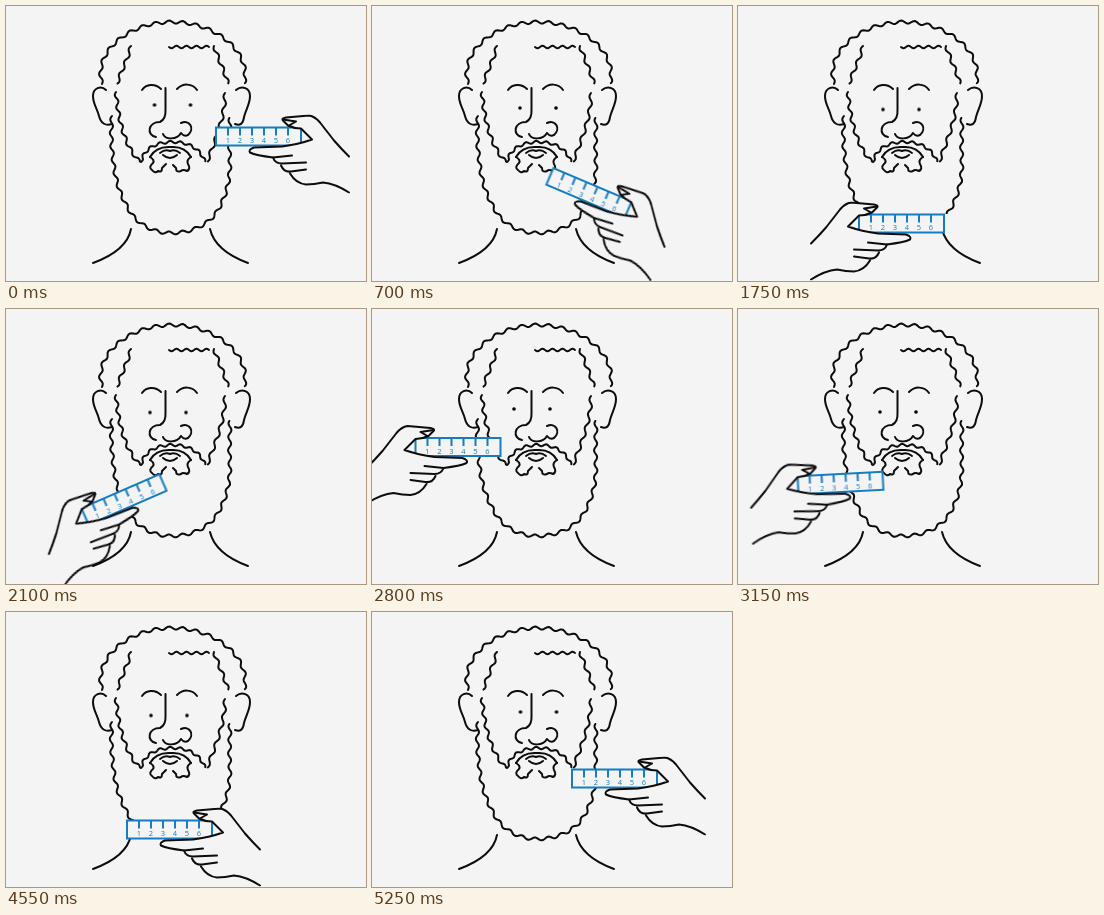
These frames come from a looping animation (360 by 275 pixels, 5.6 s). An HTML page:

```html
<!DOCTYPE html>
<html lang="en">
<head>
<meta charset="utf-8">
<title>Beard measuring</title>
<style>
html, body { margin: 0; width: 100%; height: 100%; overflow: hidden; background: #f4f4f4; }
svg { display: block; width: 360px; height: 275px; }
.ink { fill: none; stroke: #0c0c0c; stroke-width: 2; stroke-linecap: round; stroke-linejoin: round; }
.skin { fill: #f4f4f4; }
.ruler { fill: #f4f4f4; stroke: #137dc5; stroke-width: 2; }
.digits { font: 7.5px "Open Sans", sans-serif; fill: #137dc5; text-anchor: middle; }
#tool, #eyes, #cover, #right, #left { animation: 5.6s step-end infinite; }
#tool { animation-name: tool; }
#eyes { animation-name: eyes; }
#cover { animation-name: cover; }
#right { animation-name: right; }
#left { animation-name: left; }

@keyframes tool {
  0%, 100% { transform: translate(252.5px, 130.5px) rotate(0deg); }
  6.25%, 93.75% { transform: translate(242.5px, 166.5px) rotate(0deg); }
  12.5%, 87.5% { transform: translate(217px, 187px) rotate(23deg); }
  18.75%, 25%, 31.25%, 68.75%, 75%, 81.25% { transform: translate(163.5px, 217.5px) rotate(0deg); }
  37.5%, 62.5% { transform: translate(118px, 190.5px) rotate(-23.5deg); }
  43.75%, 56.25% { transform: translate(102.5px, 174px) rotate(-3deg); }
  50% { transform: translate(86px, 138px) rotate(0deg); }
}
@keyframes eyes {
  0%, 100% { transform: translate(148.5px, 99px); }
  6.25%, 93.75% { transform: translate(148.5px, 100px); }
  12.5%, 87.5% { transform: translate(148px, 102px); }
  18.75%, 25%, 31.25%, 68.75%, 75%, 81.25% { transform: translate(145px, 103.5px); }
  37.5%, 62.5% { transform: translate(144px, 103.5px); }
  43.75%, 56.25% { transform: translate(142px, 103px); }
  50% { transform: translate(142px, 100px); }
}
@keyframes cover {
  0%, 37.5%, 87.5%, 100% { visibility: hidden; }
  18.75%, 68.75% { visibility: visible; }
}
@keyframes right {
  0%, 75%, 100% { visibility: visible; }
  31.25% { visibility: hidden; }
}
@keyframes left {
  0%, 81.25%, 100% { visibility: hidden; }
  25% { visibility: visible; }
}
</style>
</head>
<body>
<svg viewBox="0 0 360 275">
  <defs>
    <g id="hand">
      <path class="skin" d="M133 29L118 13L104 -5Q99 -11 93 -12L70 -10Q65 -9 67 -7L72 -2Q78 1 85 1L96 12Q82 17 66 19L38 20Q32 22 34 25Q40 28 57 30Q59 36 65 36Q68 44 74 45Q80 56 90 57L107 55Q119 56 133 65Z"/>
      <path class="ink" d="M133 29Q125 21 118 13L104 -5Q99 -11 93 -12L70 -10Q65 -9 67 -7L72 -2Q78 1 85 1L96 12Q82 17 66 19L38 20Q32 22 34 25Q40 28 57 30L76 28"/>
      <path class="ink" d="M57 30Q59 36 66 36L90 35M65 38Q68 45 75 44L90 42M74 46Q80 56 90 57Q98 57 107 55Q119 56 133 65M67 -8L80 -6L73 -2"/>
    </g>
  </defs>

  <g class="ink">
    <path class="wavy" d="M96 78C87 46 122 16 166 16C210 16 246 46 238 78"/>
    <path class="wavy" d="M125 40C122 53 115 65 111 78"/>
    <path class="wavy" d="M110 86C112 112 118 140 134 156"/>
    <path class="wavy small" d="M163 41H203"/>
    <path class="wavy" d="M208 40C213 55 219 66 222 78"/>
    <path class="wavy" d="M219 87C219 112 210 132 201 156"/>
    <path class="wavy" d="M106 110C105 124 105 138 107 152C109 176 115 190 123 204C131 218 147 227 165 227C185 227 203 219 212 204C221 188 224 174 224 156C223 142 224 128 224 111"/>
  </g>
  <rect id="cover" class="skin" x="110" y="208" width="110" height="24"/>

  <g class="ink">
    <path d="M100 84C95 79 87 82 87 90C87 98 91 102 93 110C95 118 100 120 106 118"/>
    <path d="M230 84C236 79 244 82 244 90C244 98 240 103 238 111C237 118 234 120 229 118"/>
    <path d="M136 84C140 78 149 77 155 83M171 83C177 77 186 77 191 84"/>
    <path d="M159.500 82V104Q160 113 154 116C142 116 140 129 150 131M157 128C159 134 171 134 175 127M175 117C184 113 189 123 182 129Q178 131 175 127"/>
    <path class="wavy small" d="M135 156C138 143 149 136 167 136C184 136 195 144 199 156"/>
    <path d="M144 151Q150 140 165 141Q179 140 185 151"/>
    <path d="M154 147Q159 143 164 145Q169 143 174 147M157 149Q164 155 171 149"/>
    <path d="M144 151Q149 154 147 157Q142 161 146 164Q149 168 152 165Q156 167 156 162L160 158"/>
    <path d="M185 151Q180 154 182 158Q185 163 181 165Q177 163 175 165Q170 167 170 162L167 159"/>
    <path d="M125 223C122 239 106 250 87 257M204 223C208 240 223 250 242 257"/>
  </g>
  <g id="eyes"><circle r="1.8"/><circle cx="36" r="1.8"/></g>

  <g id="tool">
    <g class="ruler">
      <rect x="-42.5" y="-9" width="85" height="18"/>
      <path d="M-30.500 -9v8m12 -8v8m12 -8v8m12 -8v8m12 -8v8m12 -8v8"/>
    </g>
    <g id="digits" class="digits"></g>
    <g id="right"><use href="#hand" transform="translate(-42.5 -9)"/></g>
    <g id="left"><use href="#hand" transform="translate(42.5 -9) scale(-1 1)"/></g>
  </g>
</svg>
<script>
// Turn each smooth guide line into a curly one.
function curl(path) {
  const small = path.classList.contains("small");
  const len = path.getTotalLength();
  const waves = Math.round(len / (small ? 10.5 : 13.5));
  const amp = small ? 1.2 : 1.5;
  const pts = [];
  for (let s = 0; s <= len; s += 1) {
    const p = path.getPointAtLength(s);
    const a = path.getPointAtLength(Math.max(0, s - 2));
    const b = path.getPointAtLength(Math.min(len, s + 2));
    const d = Math.hypot(b.x - a.x, b.y - a.y);
    const off = amp * Math.sin(2 * Math.PI * waves * s / len) / d;
    pts.push((p.x - (b.y - a.y) * off).toFixed(2) + " " + (p.y + (b.x - a.x) * off).toFixed(2));
  }
  path.setAttribute("d", "M" + pts.join("L"));
}
document.querySelectorAll(".wavy").forEach(curl);

const digits = document.getElementById("digits");
for (let n = 1; n <= 6; n++) {
  const t = document.createElementNS(digits.namespaceURI, "text");
  t.setAttribute("x", -42.5 + 12 * n);
  t.setAttribute("y", 6.5);
  t.textContent = n;
  digits.append(t);
}
</script>
</body>
</html>
```
